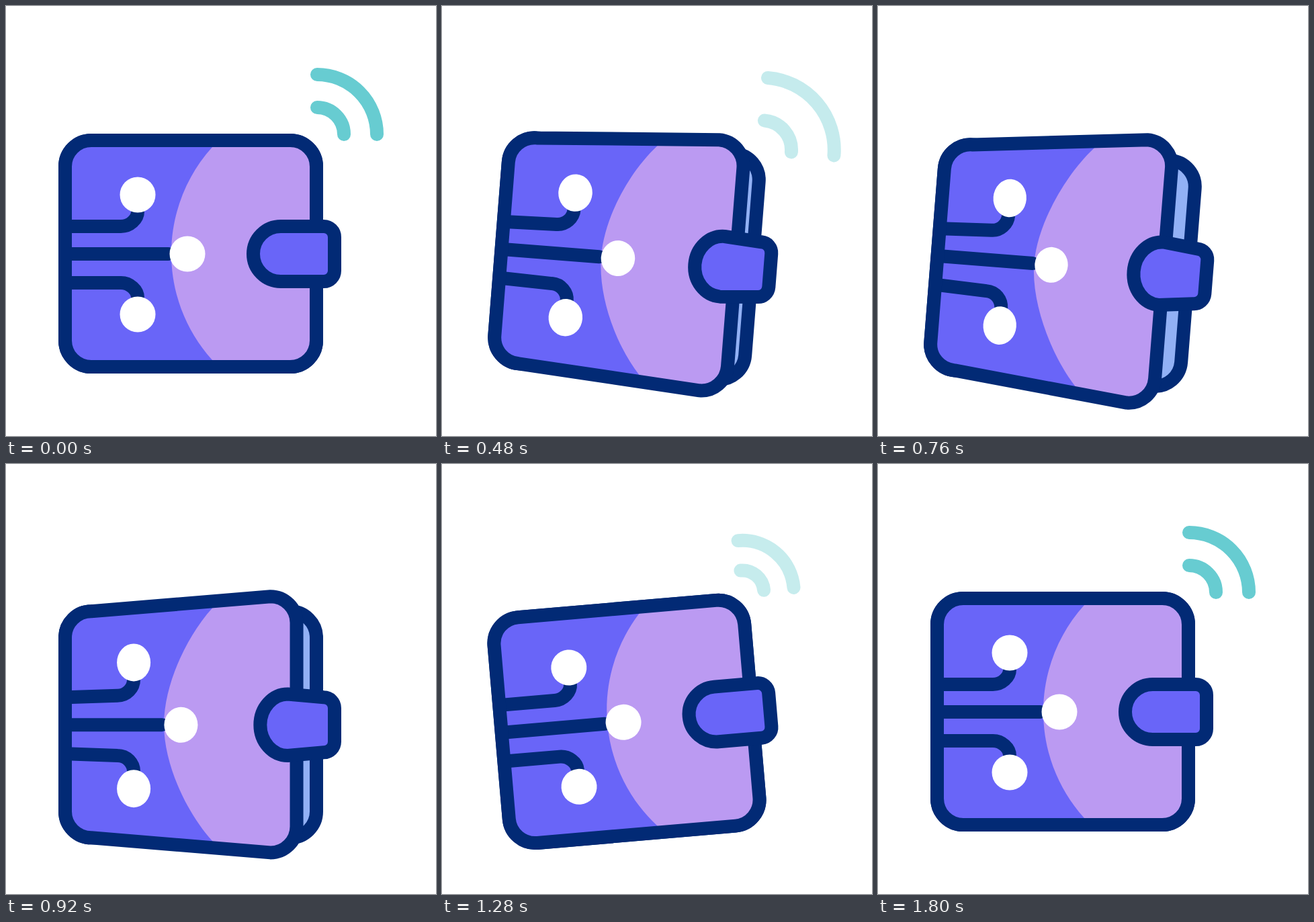
Recreate the animation shown at these times as an HTML page. Size 640 by 640 pixels, loop 1880 ms.

```html
<!DOCTYPE html>
<html lang="en">
<head>
<meta charset="utf-8">
<title>Wallet</title>
<style>
  html, body { margin: 0; width: 100%; height: 100%; overflow: hidden; background: #fff; }
  svg { display: block; width: 100%; height: 100%; }
  .line { fill: none; stroke: #022a75; stroke-width: 20; stroke-linecap: round; stroke-linejoin: round; }
  .wave { fill: none; stroke: #67ccd1; stroke-width: 20; stroke-linecap: round; }
  .violet { fill: #6965f8; }
</style>
</head>
<body>
<svg viewBox="0 0 640 640">
  <clipPath id="clip"><path id="clipShape"/></clipPath>
  <g id="wallet">
    <g id="waves">
      <path id="innerWave" class="wave"/>
      <path id="outerWave" class="wave"/>
    </g>
    <path id="back" class="line" style="fill:#92b1f5"/>
    <path id="panel" class="violet"/>
    <g clip-path="url(#clip)"><path id="glow" fill="#bb9af2"/></g>
    <path id="circuit" class="line"/>
    <g fill="#fff">
      <ellipse id="dotTop"/>
      <ellipse id="dotMiddle"/>
      <ellipse id="dotBottom"/>
    </g>
    <path id="frame" class="line"/>
    <path id="strap" class="line" style="fill:#6965f8"/>
  </g>
</svg>
<script>
const LOOP = 1880, STEP = 40;
const el = id => document.getElementById(id);
const set = (id, attrs) => {
  for (const name in attrs) el(id).setAttribute(name, attrs[name]);
};

// Easing along a cubic Bézier with handles (x1, 0) and (x2, 1).
const bezier = (x1, x2) => x => {
  let low = 0, high = 1;
  for (let i = 0; i < 24; i++) {
    const u = (low + high) / 2, v = 1 - u;
    if (3 * u * v * v * x1 + 3 * u * u * v * x2 + u ** 3 < x) low = u;
    else high = u;
  }
  return low * low * (3 - 2 * low);
};
const swing = bezier(.67, .33), sink = bezier(.5, .6), lift = bezier(.7, .45), hinge = bezier(.5, .5);
const linear = x => x;

// Keys are [time, value] pairs.
function animate(t, keys, ease) {
  if (t <= keys[0][0]) return keys[0][1];
  for (let i = 1; i < keys.length; i++) {
    const [t0, a] = keys[i - 1], [t1, b] = keys[i];
    if (t <= t1) return a + (b - a) * ease((t - t0) / (t1 - t0));
  }
  return keys[keys.length - 1][1];
}

// Rounded panel whose right-hand corners shift inwards and apart.
function panelPath(open) {
  const x = 423 - open, rise = .75 * open;
  return `M88 498V239A39 39 0 0 1 127 200L${x} ${200 - rise}a39 39 0 0 1 39 39` +
    `V${498 + rise}a39 39 0 0 1-39 39L127 537A39 39 0 0 1 88 498Z`;
}

const wavePath = r => `M463 ${191 - r}A${r} ${r} 0 0 1 ${463 + r} 191`;

function drawWaves(t) {
  const leaving = animate(t, [[80, 0], [720, 1]], linear);
  const returning = animate(t, [[1000, 0], [1760, 1]], linear);
  const out = leaving ** 2.3, missing = (1 - returning) ** 2;
  const back = t >= 1000;
  set('waves', { opacity: back ? returning : 1 - leaving });
  set('innerWave', { d: wavePath(back ? 40 - 20 * missing : 40 + 10.6 * out) });
  set('outerWave', { d: wavePath(back ? 89 - 31 * missing : 89 + 54 * out) });
}

function drawPanel(open) {
  const d = panelPath(open);
  for (const id of ['panel', 'frame', 'clipShape']) set(id, { d });

  // The bulge keeps its curve handles while its three points move apart.
  const left = 246 - .37 * open, top = 210 - .5 * open, bottom = 527 + .5 * open;
  set('glow', {
    d: `M480 100H390L307 ${top}C267.7 ${top + 43.5} ${left} 310 ${left} 368.5` +
       `C${left} 427 267.7 ${bottom - 43.5} 307 ${bottom}L390 637H480Z`
  });

  const x = 196 - .2 * open, dy = .165 * open, rx = 26.5 - .05 * open, ry = 26.5 + .05 * open;
  set('dotTop', { cx: x, cy: 281 - dy, rx, ry });
  set('dotBottom', { cx: x, cy: 459 + dy, rx, ry });
  set('dotMiddle', { cx: 270 - .325 * open, cy: 369, rx, ry: 26.5 });

  const bend = 171 - .17 * open, upper = 328 - .09 * open, lower = 412 + .09 * open;
  set('circuit', {
    d: `M90 328L${bend} ${upper}C${bend + 13.5} ${upper} ${x} ${upper - 11} ${x} ${306 - dy}` +
       `M90 369H${242 - .325 * open}` +
       `M90 412L${bend} ${lower}C${bend + 13.5} ${lower} ${x} ${lower + 11} ${x} ${434 + dy}`
  });
}

function drawStrap(open) {
  const x = 409 + .35 * open, dy = .16 * open;
  set('strap', {
    d: `M${x} ${328 - dy}L473 328a16 16 0 0 1 16 16V394a16 16 0 0 1-16 16` +
       `L${x} ${410 + dy}A41 ${41 + dy} 0 0 1 ${x} ${328 - dy}Z`
  });
}

function draw(t) {
  const angle = animate(t, [[80, 0], [640, 5], [1200, -5], [1760, 0]], swing);
  const drop = animate(t, [[80, 0], [920, 19.3]], sink) - animate(t, [[920, 0], [1760, 19.3]], lift);
  const open = animate(t, [[80, 0], [760, 37], [1240, 0]], hinge);
  set('wallet', { transform: `translate(0 ${drop}) rotate(${angle} 275 368.5)` });
  drawWaves(t);
  drawPanel(open);
  drawStrap(open);
}

set('back', { d: panelPath(0) });
const start = performance.now();
function tick() {
  const t = (performance.now() - start) % LOOP;
  draw(Math.floor(t / STEP) * STEP);
  requestAnimationFrame(tick);
}
tick();
</script>
</body>
</html>
```
